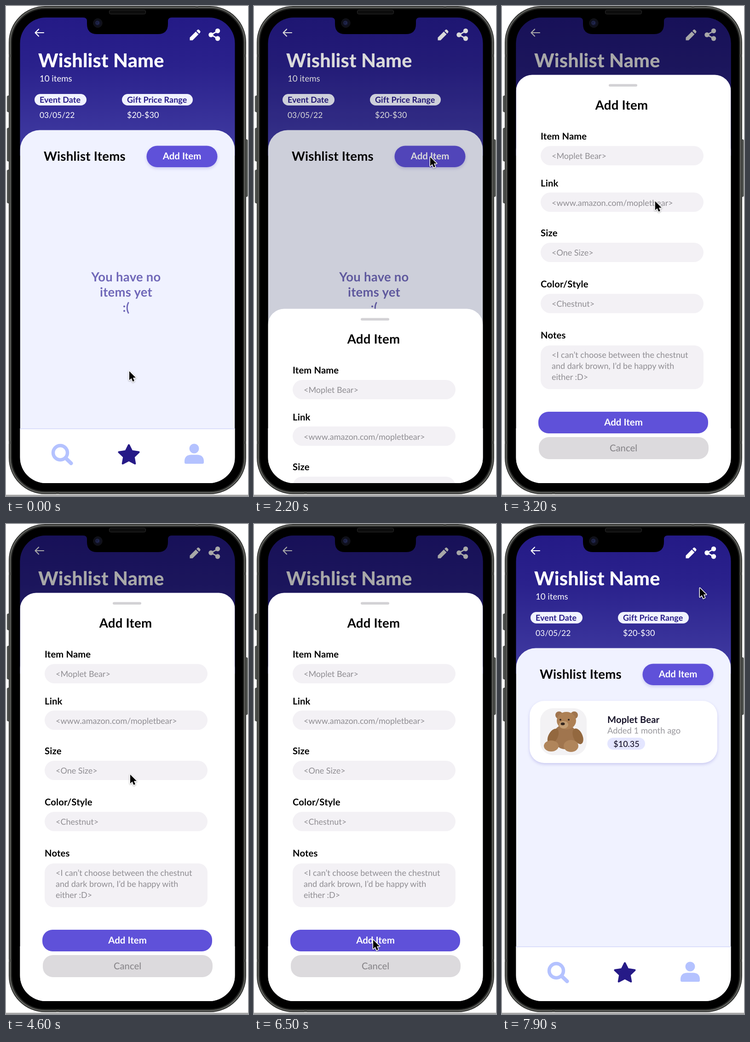
Animation, 526 px wide and 1064 px high, one loop 8000 ms. Source, as an HTML page:

```html
<!DOCTYPE html>
<html lang="en">
<head>
<meta charset="utf-8">
<title>Wishlist</title>
<style>
html, body { margin: 0; width: 100%; height: 100%; overflow: hidden; background: #fff; }
svg { display: block; width: 526px; height: 1064px; }
text { font-family: Lato, "Open Sans", sans-serif; font-size: 18px; text-rendering: geometricPrecision; }
.white { fill: #fff; }
.pale { fill: #f0f2ff; }
.navy { fill: #261a87; }
.violet { fill: #5f51d9; }
.soft { fill: #b4c2ff; }
.field { fill: #f3f1f5; }
.hint { fill: #8f8d92; }
.title { font-size: 41.4px; font-weight: 800; letter-spacing: .2px; }
.head { font-size: 27.6px; font-weight: 700; letter-spacing: .25px; }
.label { font-size: 20.2px; font-weight: 700; letter-spacing: .15px; }
.btn { font-size: 20.5px; font-weight: 700; }
.chip { font-size: 17.9px; font-weight: 700; letter-spacing: .1px; }
.mid { text-anchor: middle; }
.note { font-size: 27.4px; font-weight: 700; letter-spacing: .3px; fill: #6f67b8; text-anchor: middle; }
.lift { filter: drop-shadow(0 3px 3px rgba(70, 60, 190, .22)); }

#empty, #card, #modal, #dim, #sheet, #cursor { animation: 8s linear infinite; }
#empty { animation-name: empty; animation-timing-function: step-end; }
#card { animation-name: card; animation-timing-function: step-end; }
#modal { animation-name: dissolve; }
#dim { animation-name: dim; }
#sheet { animation-name: rise; }
#cursor { animation-name: point; animation-timing-function: ease-in-out; filter: drop-shadow(0 1px 1.5px rgba(0, 0, 0, .35)); }

@keyframes empty { 0% { opacity: 1; } 81.81%, 100% { opacity: 0; } }
@keyframes card { 0% { opacity: 0; } 81.81%, 100% { opacity: 1; } }
@keyframes dissolve {
  0% { opacity: 1; }
  81.81% { opacity: 1; animation-timing-function: ease-out; }
  85.56%, 100% { opacity: 0; }
}
@keyframes dim {
  0% { opacity: 0; }
  26.44% { opacity: 0; animation-timing-function: ease-out; }
  30.19%, 100% { opacity: .34; }
}
@keyframes rise {
  0% { transform: translateY(886px); }
  26.44% { transform: translateY(886px); animation-timing-function: ease-out; }
  30.19%, 100% { transform: none; }
}
@keyframes point {
  0%, 5% { transform: translate(268px, 793px); }
  16%, 18% { transform: translate(382px, 324px); }
  24%, 33% { transform: translate(383px, 328px); }
  48%, 67.5% { transform: translate(270px, 544px); }
  79%, 86% { transform: translate(259px, 903px); }
  97%, 100% { transform: translate(430px, 139px); }
}
</style>
</head>
<body>
<svg viewBox="0 0 526 1064">
  <defs>
    <linearGradient id="sky" x1="0" y1="0" x2="0" y2="1">
      <stop offset="0" stop-color="#241a86"/>
      <stop offset=".35" stop-color="#2a218c"/>
      <stop offset="1" stop-color="#423da3"/>
    </linearGradient>
    <radialGradient id="lens">
      <stop offset="0" stop-color="#20264e"/>
      <stop offset=".45" stop-color="#121428"/>
      <stop offset="1" stop-color="#0b0b10"/>
    </radialGradient>
    <clipPath id="screen"><rect x="30.5" y="25" width="467" height="1011" rx="56"/></clipPath>
  </defs>

  <!-- phone body -->
  <path d="M0 1062.5H526" stroke="#6a6a6a" stroke-width="1.5"/>
  <g fill="#555855" stroke="#3a3c3a" stroke-width="1">
    <rect x="2.5" y="195" width="6" height="35" rx="2"/>
    <rect x="2.5" y="265" width="6" height="72" rx="2"/>
    <rect x="2.5" y="356" width="6" height="72" rx="2"/>
    <rect x="519" y="290" width="6" height="124" rx="2"/>
  </g>
  <rect x="6" y="0" width="516" height="1060" rx="79" fill="#2b2c2a"/>
  <rect x="9" y="3" width="510" height="1054" rx="76" fill="none" stroke="#646561" stroke-width="2.5"/>
  <rect x="12" y="6" width="504" height="1048" rx="73" fill="#000" stroke="#252624" stroke-width="2"/>
  <path d="M6 108h5M517 108h5M6 948h5M517 948h5M415 0v5M112 1055v5" stroke="#4a4b48" stroke-width="6"/>
  <rect x="224.5" y="9" width="79" height="8.5" rx="3" fill="#0d0d0d" stroke="#2c2c2c"/>

  <g clip-path="url(#screen)">
    <!-- header -->
    <rect x="30" y="25" width="468" height="300" fill="url(#sky)"/>
    <g fill="none" stroke="#fff" stroke-width="2.2" stroke-linecap="round" stroke-linejoin="round">
      <path d="M82 58H64M71 50.5L63.5 58L71 65.5"/>
      <path d="M460 54.5L445.5 62.5L460 70.5" stroke-width="2.6"/>
    </g>
    <g class="white">
      <circle cx="460" cy="54" r="5.2"/><circle cx="445.5" cy="62.5" r="5.2"/><circle cx="460" cy="70.5" r="5.2"/>
      <path d="M399.500 74.500V68.500L412.500 55.500L418.500 61.500L405.500 74.500ZM414 54L416.500 51.500Q418 50.300 419.500 51.700L422 54.300Q423.300 56 422 57.500L420 60Z"/>
      <text class="title" x="70" y="133">Wishlist Name</text>
      <text x="73" y="164" style="font-size:18.6px">10 items</text>
      <text x="73" y="243" style="font-size:17.4px">03/05/22</text>
      <text x="263" y="243">$20-$30</text>
    </g>
    <rect class="pale" x="62" y="191" width="113" height="25" rx="12.5"/>
    <rect class="pale" x="252" y="191" width="154" height="25" rx="12.5"/>
    <text class="chip navy" x="73" y="210">Event Date</text>
    <text class="chip navy" x="263" y="210">Gift Price Range</text>

    <!-- list -->
    <rect class="pale" x="30.5" y="269.5" width="467" height="800" rx="43"/>
    <text class="head" x="82" y="336">Wishlist Items</text>
    <rect class="violet lift" x="305.5" y="303.5" width="154" height="46.5" rx="23"/>
    <text class="btn white mid" x="382.5" y="333">Add Item</text>

    <g id="empty">
      <text class="note" x="261" y="598">You have no</text>
      <text class="note" x="261" y="631">items yet</text>
      <text class="note" x="261" y="664">:(</text>
    </g>

    <g id="card">
      <rect class="white lift" x="60" y="384" width="408" height="135" rx="32"/>
      <rect x="83" y="400" width="101" height="102" rx="28" fill="#f3f2f4"/>
      <g fill="#a0754e">
        <circle cx="124" cy="415" r="8"/><circle cx="157" cy="415" r="8"/>
        <ellipse cx="137" cy="462" rx="26" ry="27"/>
        <g fill="#93683f">
          <ellipse cx="111" cy="461" rx="10" ry="18" transform="rotate(28 111 461)"/>
          <ellipse cx="165" cy="461" rx="10" ry="18" transform="rotate(-24 165 461)"/>
        </g>
        <ellipse cx="140" cy="427" rx="21" ry="19" fill="#ad8055"/>
        <ellipse cx="107" cy="482" rx="16" ry="12" fill="#b0855b"/>
        <ellipse cx="150" cy="482" rx="16" ry="13" fill="#b0855b"/>
        <ellipse cx="134" cy="436" rx="10" ry="8" fill="#c39e74"/>
      </g>
      <g fill="#33251d">
        <ellipse cx="132" cy="434" rx="4.5" ry="3"/>
        <circle cx="127" cy="425" r="2"/><circle cx="145" cy="425" r="2"/>
      </g>
      <text class="label" x="229" y="432" fill="#161228">Moplet Bear</text>
      <text x="229" y="455" fill="#97969b" style="font-size:18.4px">Added 1 month ago</text>
      <rect x="229" y="464" width="82" height="26" rx="13" fill="#e4e6ff"/>
      <text class="mid" x="270.5" y="484" fill="#161228" style="font-weight:500">$10.35</text>
    </g>

    <!-- tab bar -->
    <rect class="white" x="30" y="918" width="468" height="120"/>
    <path d="M30 918H498" stroke="#dcdffb" stroke-width="2"/>
    <g fill="none" stroke="#b4c2ff">
      <circle cx="118" cy="970" r="15.5" stroke-width="7.5"/>
      <path d="M130 982L141.5 993" stroke-width="8" stroke-linecap="round"/>
    </g>
    <path class="navy" d="M267 953.500L273.500 966.500L288.500 968.700L277.700 979L280.300 993.500L267 986.500L253.700 993.500L256.300 979L245.500 968.700L260.500 966.500Z" stroke="#261a87" stroke-width="4" stroke-linejoin="round"/>
    <g class="soft">
      <circle cx="409" cy="961" r="10.5"/>
      <path d="M388 991V989Q388 974.500 403 974.500H415Q430 974.500 430 989V991Q430 994 427 994H391Q388 994 388 991Z"/>
    </g>

    <!-- add form -->
    <g id="modal">
      <rect id="dim" x="30" y="25" width="468" height="1011"/>
      <g id="sheet">
        <rect class="white" x="30.5" y="149.5" width="467" height="950" rx="35"/>
        <rect x="232" y="169.5" width="62" height="5.5" rx="2.7" fill="#d3d2d5"/>
        <text class="head mid" x="260" y="225">Add Item</text>
        <text class="label" x="84" y="290">Item Name</text>
        <text class="label" x="84" y="392">Link</text>
        <text class="label" x="84" y="500">Size</text>
        <text class="label" x="84" y="611">Color/Style</text>
        <text class="label" x="84" y="722">Notes</text>
        <g class="field">
          <rect x="84" y="304" width="354" height="42" rx="21"/>
          <rect x="84" y="405" width="354" height="42" rx="21"/>
          <rect x="84" y="514" width="354" height="42" rx="21"/>
          <rect x="84" y="625" width="354" height="42" rx="21"/>
          <rect x="84" y="737" width="354" height="95" rx="20"/>
        </g>
        <g class="hint">
          <text x="108" y="332">&lt;Moplet Bear&gt;</text>
          <text x="108" y="434">&lt;www.amazon.com/mopletbear&gt;</text>
          <text x="108" y="542">&lt;One Size&gt;</text>
          <text x="108" y="653">&lt;Chestnut&gt;</text>
          <text x="108" y="764">&lt;I can’t choose between the chestnut</text>
          <text x="108" y="788">and dark brown, I’d be happy with</text>
          <text x="108" y="812">either :D&gt;</text>
        </g>
        <rect class="violet" x="79" y="881" width="369" height="47" rx="22"/>
        <text class="btn white mid" x="264" y="911">Add Item</text>
        <rect x="80" y="936" width="369" height="48" rx="22" fill="#dcdadd"/>
        <text class="mid" x="264" y="967" fill="#89878b" style="font-size:20.3px;font-weight:500">Cancel</text>
      </g>
    </g>
  </g>

  <!-- notch -->
  <path d="M168 24V25Q176 25 176 33V39Q176 61 198 61H330Q352 61 352 39V33Q352 25 360 25V24Z"/>
  <circle cx="199.5" cy="37" r="9.5" fill="url(#lens)" stroke="#1b1c24"/>
  <circle cx="198.5" cy="36.5" r="3.5" fill="none" stroke="#2c3468"/>

  <path id="cursor" d="M0 0V19.500L4.400 15.300L7.600 22.600L11 21L8 14H14Z" stroke="#fff" stroke-width="3" stroke-linejoin="round" paint-order="stroke"/>
</svg>
</body>
</html>
```
